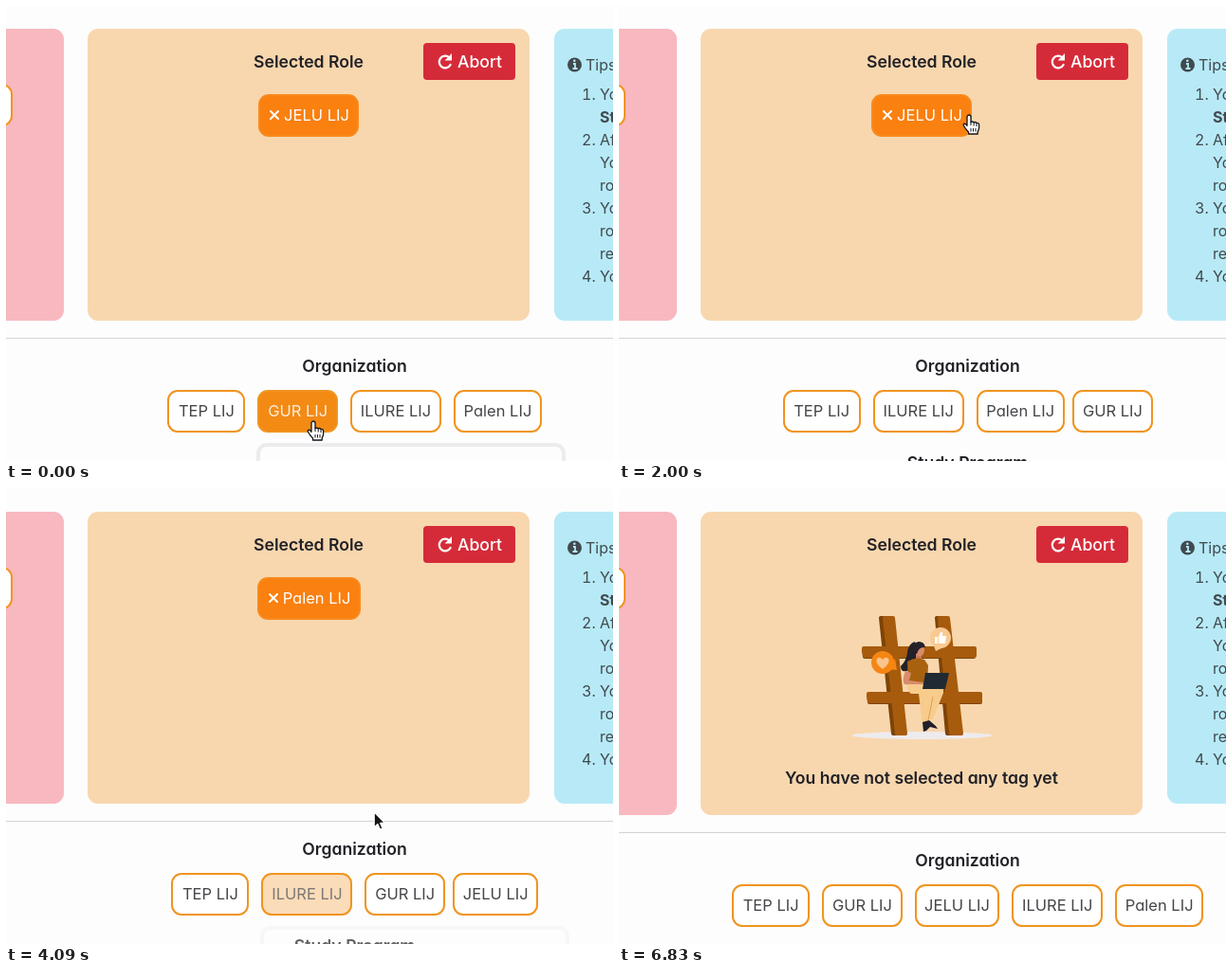
Recreate the animation shown at these times as an HTML page. Size 640 by 480 pixels, loop 6880 ms.

```html
<!DOCTYPE html>
<html lang="en">
<head>
<meta charset="utf-8">
<title>Role picker</title>
<style>
  html, body { margin: 0; width: 100%; height: 100%; overflow: hidden; background: #fdfdfe; }
  #stage {
    position: relative; width: 640px; height: 480px; overflow: hidden;
    background: #fdfdfe; color: #212126;
    font: 16.5px/24px Inter, "Open Sans", sans-serif;
    font-feature-settings: "cv11";
  }
  #stage * { box-sizing: border-box; }
  #stage > *, #lower > *, .tag, .tip { position: absolute; white-space: nowrap; }
  .panel { top: 24px; height: 308px; border-radius: 11px; }
  #left { left: -200px; width: 261px; background: #f8b8bf; }
  #mid { left: 86px; width: 466px; background: #f8d7ae; }
  #right { left: 578px; width: 200px; background: #b7eaf6; }
  .empty .grow { height: 320px; }
  .title { font-size: 17.6px; font-weight: 600; transform: translateX(-50%); }
  #abort {
    left: 440px; top: 39px; width: 97px; height: 39px; border-radius: 4px;
    padding: 8px 0 0 36px; font-size: 17.6px; font-weight: 500; line-height: 23px; color: #fff;
    background: color-mix(in srgb, #b01f2c var(--h, 0%), #d52b39);
  }
  #lower { left: 0; top: 0; width: 640px; height: 480px; }
  .empty #lower { transform: translateY(12px); }
  #rule { left: 0; top: 350px; width: 640px; height: 1px; background: #d3d3d6; }
  .tag {
    height: 44.5px; border: 2px solid #f0941f; border-radius: 11px;
    text-align: center; line-height: 41px;
  }
  .pool {
    top: 405px;
    color: color-mix(in srgb, #fbeedd var(--h), #46464a);
    background: color-mix(in srgb, #f38a14 var(--h), #fff);
  }
  .chosen {
    top: 93px; padding-left: 17px; color: #fff;
    background: #fa8010; border-color: #f78a1c;
  }
  .chosen svg { position: absolute; left: 9px; top: 14px; }
  .tip {
    left: -3px; top: 54px; width: 326px; height: 120px; border-radius: 11px;
    border: 4px solid #ececee; background: #fdfdfe; opacity: var(--h);
  }
  #tips { left: 611px; top: 50px; color: #414a4f; font-size: 16px; }
  #tips ol { position: absolute; left: 15px; top: 31px; margin: 0; padding: 0; line-height: 24px; }
  #art { display: none; }
  .empty #art { display: block; }
  svg { overflow: visible; }
  #icons, #art, #cursor { left: 0; top: 0; }
  #cursor { z-index: 2; }
</style>
</head>
<body>
<div id="stage">
  <div id="left" class="panel grow"></div>
  <div class="tag" style="left:-80px;top:82px;width:87px;background:#fff"></div>
  <div id="mid" class="panel grow"></div>
  <div id="right" class="panel"></div>
  <div class="title" style="left:319px;top:47px">Selected Role</div>
  <div id="abort">Abort</div>
  <div id="tips">Tips
    <ol>
      <li>You pick<br><b>Start</b></li>
      <li>After that<br>You see<br>roles</li>
      <li>You drop<br>roles<br>return</li>
      <li>You can</li>
    </ol>
  </div>
  <svg id="icons" width="640" height="480" fill="none">
    <path d="M467.5 54.5A6.3 6.3 0 1 0 468.6 62" stroke="#fff" stroke-width="2.3" stroke-linecap="round"/>
    <path d="M470 50v7.4h-7.4z" fill="#fff"/>
    <circle cx="599.5" cy="62" r="7.5" fill="#414a4f"/>
    <path d="M598 61h2v5m-2.5 0h5" stroke="#b7eaf6" stroke-width="1.8"/>
    <circle cx="599.3" cy="57.8" r="1.3" fill="#b7eaf6"/>
  </svg>

  <div id="art">
    <svg width="640" height="480">
      <ellipse cx="319.5" cy="260" rx="74" ry="4" fill="#eeebee"/>
      <g stroke-linejoin="round" stroke-width="4">
        <g fill="#7d4308" stroke="#7d4308">
          <path d="M276 136h9l13 122h-9zM335 136h9l12 122h-10z"/>
          <path d="M258 169h116v8H259zM263 217h118v8H264z"/>
        </g>
        <g fill="#a75b0c" stroke="#a75b0c">
          <path d="M280 136h9l13 122h-9zM338 136h9l14 122h-11z"/>
          <path d="M258 168h117v8H259zM263 216h118v8H264z"/>
        </g>
      </g>
      <path d="M291 179l2 12-11-1z" fill="#f58614"/>
      <circle cx="278" cy="183" r="12" fill="#f58614"/>
      <path d="M278 190q-9-7-6-11 3-3 6 1 3-4 6-1 3 4-6 11z" fill="#fac48c"/>
      <path d="M331 163l3 8 8-4z" fill="#f8ca92"/>
      <circle cx="339" cy="157" r="11" fill="#f8ca92"/>
      <path d="M333 156h3v7h-3zM337 156l2-5q3-1 2 4h4l-1 8h-7z" fill="#fff"/>
      <path d="M312 161q-7 2-8 12-1 8-7 14 0 8 9 4l11-14z" fill="#242129"/>
      <path d="M313 174h6v7h-6z" fill="#c47a5c"/>
      <ellipse cx="317" cy="170" rx="5" ry="6.5" fill="#d88c6c"/>
      <path d="M310 173q-2-11 6-12 6 0 7 6-7-1-9 7z" fill="#242129"/>
      <path d="M304 182q9-6 18-2l4 6-1 21h-20z" fill="#a8620f"/>
      <path d="M302 192l6 2-2 8 15 2-1 4-19-2q-3-4 1-14z" fill="#d88c6c"/>
      <path d="M305 206h30q9 1 7 9l-11 28-6-1 4-23-2 27-7 3-4-33h-8q-6-5-3-10z" fill="#f8cc8c"/>
      <path d="M331 219l-5 25" stroke="#d9a257" fill="none"/>
      <path d="M320 246l7-2 7 6 2 3-8-2-4 4-3 1z" fill="#222028"/>
      <path d="M323 194h25l-4 17h-24z" fill="#1f2a33"/>
    </svg>
  </div>
  <div id="none" class="title" style="left:319px;top:293px">You have not selected any tag yet</div>

  <div id="lower">
    <div id="rule"></div>
    <div class="title" style="left:367.5px;top:368px">Organization</div>
    <div class="title" style="left:367.5px;top:470px">Study Program</div>
  </div>

  <svg id="cursor" width="640" height="480" stroke-linejoin="round">
    <g id="hand" transform="translate(-1 -1)" fill="#fff" stroke="#151518" stroke-width="1.3">
      <path d="M-2 2a2 2 0 0 1 4 0v5.5q1.5-1.2 3.2.3 1.6-.9 2.8.6 2.6-.4 2.6 2.2v3q0 2-1.4 4v2.4H-.5v-2q-3.2-3-5.3-7.2 0-2.3 2.4-1.2l1.4 1.6z"/>
      <path d="M2 7v4M5.2 8v3.5M8 9v3M2 14v3.5M4.5 14v3.5M7 14v3.5" fill="none" stroke-width="1"/>
    </g>
    <path id="arrow" d="M0 0v16l3.7-3.4 2.5 5.7 2.7-1.2-2.5-5.5h5z" fill="#151518" stroke="#fff" stroke-width="1.2"/>
  </svg>
</div>

<script>
  const LOOP = 6880, FADE = 300, GAP = 8.5, SPACE = 4.5;
  const $ = id => document.getElementById(id);
  const stage = $('stage');

  // key: label, width in the pool, width when chosen
  const tags = {
    B: ['TEP LIJ', 82, 98],
    D: ['GUR LIJ', 84.5, 101],
    K: ['JELU LIJ', 89.5, 105.5],
    I: ['ILURE LIJ', 96, 112],
    S: ['Palen LIJ', 93, 109]
  };

  // start, chosen tags, pool order (a blank widens the gap)
  const states = [
    [0, 'K', 'B D I S'],
    [400, 'KD', 'B I S'],
    [1500, 'K', 'B I SD'],
    [2350, '', 'B I SDK'],
    [3720, 'S', 'B I DK'],
    [5310, '', 'B D K I S']
  ];

  // tag, pointer enters, pointer leaves
  const hovers = [
    ['D', -FADE, 400], ['I', 400, 815],
    ['S', 3160, 3720], ['I', 3720, 3950]
  ];

  // time, x, y of the pointer tip
  const path = [
    [0, 325, 439], [770, 325, 439], [1020, 410, 107], [1600, 410, 107],
    [1980, 370, 116], [2600, 370, 116], [3250, 359, 428], [3850, 359, 428],
    [4600, 479, 70], [5650, 479, 70], [6050, 660, 110], [LOOP, 660, 110]
  ];

  const cross = '<svg width="12" height="12"><path d="M2 2l8 8m0-8l-8 8" stroke="#fff" stroke-width="2" stroke-linecap="round"/></svg>';

  function addTag(parent, kind, html) {
    const el = document.createElement('div');
    el.className = 'tag ' + kind;
    el.innerHTML = html;
    parent.appendChild(el);
    return el;
  }

  const pool = {}, chosen = {};
  for (const key in tags) {
    pool[key] = addTag($('lower'), 'pool', tags[key][0] + '<div class="tip"></div>');
    chosen[key] = addTag(stage, 'chosen', cross + tags[key][0]);
  }

  const clamp = v => Math.max(0, Math.min(1, v));
  const fade = (t, from, to) =>
    clamp(clamp((Math.min(t, to) - from) / FADE) - Math.max(0, t - to) / FADE);

  // Places a centred row and returns its hit boxes
  function layout(els, row, col, center, top) {
    for (const key in els) els[key].style.display = row.includes(key) ? 'block' : 'none';
    const boxes = [];
    let x = 0;
    for (const key of row) {
      if (key === ' ') { x += SPACE; continue; }
      const w = tags[key][col];
      boxes.push([key, x, w]);
      x += w + GAP;
    }
    const start = center - (x - GAP) / 2;
    return boxes.map(([key, left, w]) => {
      els[key].style.left = start + left + 'px';
      els[key].style.width = w + 'px';
      return [start + left, top, w, 44.5];
    });
  }

  function pointer(t) {
    const i = path.findIndex(p => p[0] > t);
    const [t0, x0, y0] = path[i - 1], [t1, x1, y1] = path[i];
    const p = (t - t0) / (t1 - t0), e = p * p * (3 - 2 * p);
    return [x0 + (x1 - x0) * e, y0 + (y1 - y0) * e];
  }

  function render(t) {
    const [, picked, row] = states.filter(s => s[0] <= t).pop();
    const empty = !picked;
    stage.className = empty ? 'empty' : '';
    $('none').style.display = empty ? 'block' : 'none';

    const boxes = [
      [440, 39, 97, 39],
      ...layout(chosen, picked, 2, 319, 93),
      ...layout(pool, row, 1, 367.7, empty ? 417 : 405)
    ];

    for (const key in pool) {
      const h = Math.max(0, ...hovers.filter(v => v[0] === key).map(v => fade(t, v[1], v[2])));
      pool[key].style.setProperty('--h', h * 100 + '%');
      pool[key].style.zIndex = h > 0 ? 1 : 0;
    }
    const dark = t < 5310 ? clamp((t - 4540) / 150) : 0;
    $('abort').style.setProperty('--h', dark * 100 + '%');

    const [x, y] = pointer(t);
    const over = boxes.some(([l, top, w, h]) => x >= l && x <= l + w && y >= top && y <= top + h);
    $('hand').style.display = over ? '' : 'none';
    $('arrow').style.display = over ? 'none' : '';
    $('cursor').style.transform = `translate(${x}px, ${y}px)`;
  }

  const begin = performance.now();
  function tick() {
    render((performance.now() - begin) % LOOP);
    requestAnimationFrame(tick);
  }
  tick();
</script>
</body>
</html>
```
